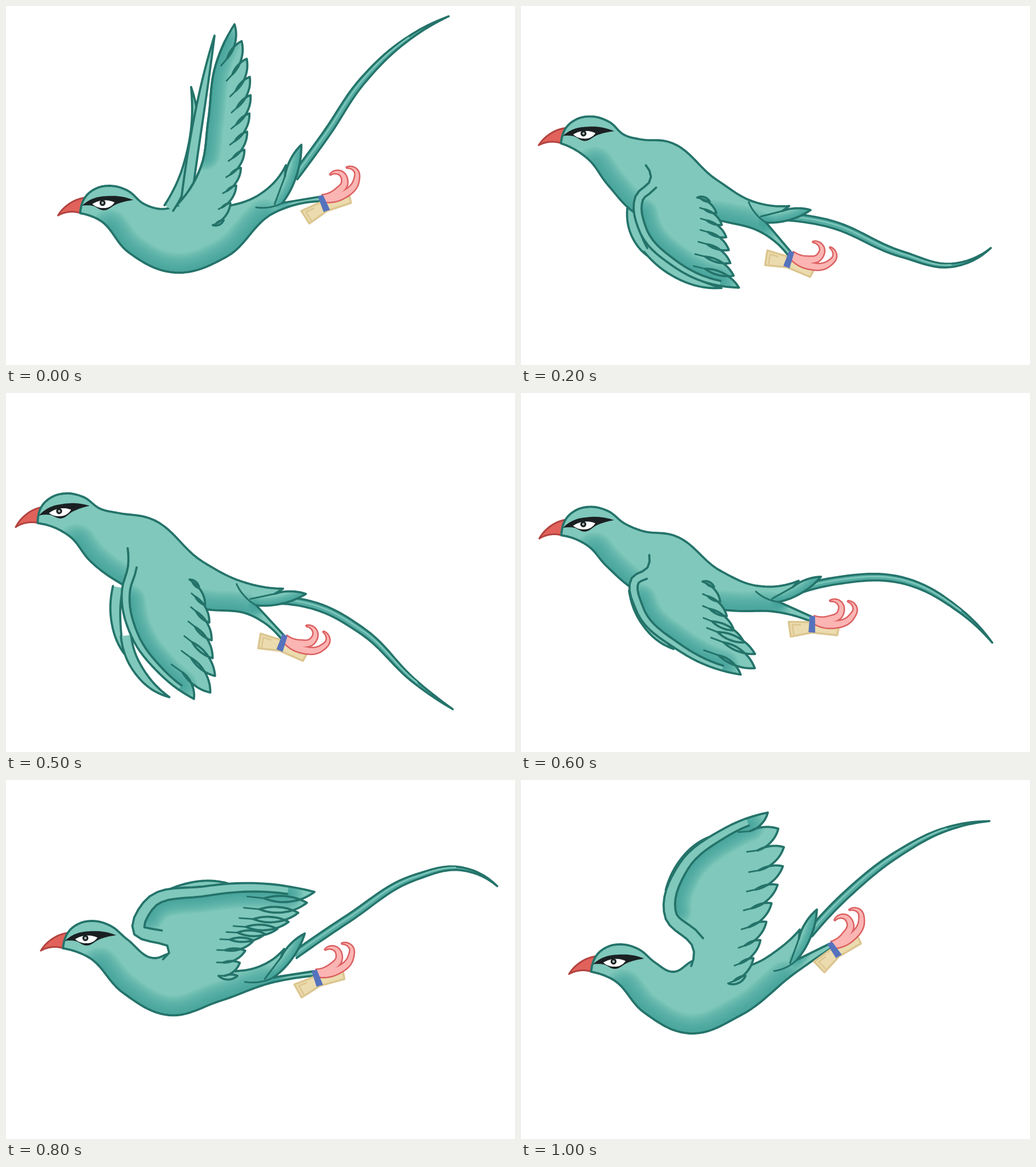
An HTML page with a canvas for the animation above (1100 ms loop, 891 by 629 pixels).

```html
<!DOCTYPE html>
<html lang="en">
<head>
<meta charset="utf-8">
<title>Messenger bird</title>
<style>
html, body { margin: 0; width: 100%; height: 100%; overflow: hidden; background: #fff; }
canvas { display: block; }
</style>
</head>
<body>
<canvas id="stage" width="891" height="629"></canvas>
<script>
const ctx = document.getElementById('stage').getContext('2d');
const LIGHT = '#7fc8bb', MID = '#55aca3', SHADE = '#3d9a95', LINE = '#24736a', INK = '#1a2022';

// Key joints as "x,y"; everything between them follows from the rules below.
// head, foot: x,y,degrees. fan: two tail tips and the hip.
// plumes: count, then angle and length of the first and the last one.
const rise = {
  side: '1', band: '0', head: '91,367,0', foot: '550,334,0',
  back: '265,355 318,346 395,349 450,326', fan: '490,279 517,243 484,345',
  belly: '470,362 385,440 295,467 215,432 160,373',
  tail: '505,300 560,225 625,130 700,60 775,18',
  far: '285,354 324,260 324,142|315,345 340,180 365,52',
  lead: '300,348 340,285 354,200 368,100 400,32',
  trail: '400,32 422,95 420,235 381,375', plumes: '11,-50,40,-25,14'
};
const dive = {
  side: '-1', band: '16', head: '45,282,1', foot: '497,414,27',
  back: '222,271 258,269 340,322 415,345', fan: '473,336 513,333 447,374',
  belly: '450,404 368,390 200,390 155,338 122,300',
  tail: '465,358 560,352 735,388 815,362 862,286',
  far: '190,375 215,420 258,441|230,420 310,453 418,463',
  lead: '236,306 246,314 197,326 188,365 260,427 438,449',
  trail: '438,449 390,405 362,372 335,357', plumes: '7,-10,48,0,17'
};
const press = {
  side: '-1', band: '16', head: '17,206,1', foot: '448,448,55',
  back: '195,196 255,206 345,287 410,344', fan: '466,365 501,382 411,385',
  belly: '400,394 338,364 203,338 150,290 108,232',
  tail: '450,380 510,408 600,482 700,546 783,562',
  far: '200,335 197,400 215,450|215,430 240,485 284,525',
  lead: '201,252 209,285 204,340 225,420 270,483 325,538',
  trail: '325,538 352,533 357,440 326,329', plumes: '7,37,55,37,14'
};
const hold = {
  side: '-1', band: '16', head: '17,235,-4.5', foot: '487,425,42',
  back: '195,210 250,219 345,296 415,331', fan: '485,343 525,352 438,372',
  belly: '430,390 345,378 203,335 148,295 110,250',
  tail: '455,364 530,370 625,418 715,505 782,554',
  far: '196,340 193,405 207,457|210,425 235,490 286,533',
  lead: '213,272 214,300 203,345 218,423 265,488 329,536',
  trail: '329,536 354,528 361,455 338,342', plumes: '7,36,60,42,15'
};
const glide = {
  side: '-1', band: '16', head: '47,275,0', foot: '531,359,7',
  back: '225,272 285,280 355,328 415,345', fan: '487,315 525,292 465,360',
  belly: '470,378 400,385 205,362 150,310 122,284',
  tail: '490,336 580,287 720,241 810,249 868,321',
  far: '200,350 250,405 327,440|300,300 360,322 440,322',
  lead: '236,296 232,306 185,303 185,338 280,410 440,451',
  trail: '440,451 467,434 383,374 338,338', plumes: '7,3,75,8,15'
};
const lift = {
  side: '1', band: '24', head: '61,299,0', foot: '539,335,3',
  back: '262,312 286,304 400,335 440,328', fan: '487,296 523,269 468,346',
  belly: '470,354 375,387 285,412 205,373 140,308',
  tail: '505,307 600,242 715,171 800,156 860,186',
  far: '262,215 315,190 388,181',
  lead: '275,314 286,302 222,265 240,215 350,186 540,196',
  trail: '540,196 493,250 425,290 405,343', plumes: '9,6,75,0,22'
};
const soar = {
  side: '1', band: '24', head: '84,340,0', foot: '540,287,-12',
  back: '265,336 303,316 400,325 450,297', fan: '488,262 518,227 483,315',
  belly: '480,338 385,412 295,444 215,407 158,348',
  tail: '505,270 575,196 665,126 745,86 820,72',
  far: '262,195 285,145 329,100',
  lead: '298,326 303,303 252,240 275,150 350,88 432,57',
  trail: '432,57 456,99 436,225 393,343', plumes: '9,-5,50,-24,22'
};
const skull = '39,-4 41,-17 47,-31 64,-46 91,-52 121,-44 151,-20';

function between(a, b) {
  const pose = {};
  for (const key in a) {
    const other = b[key].match(/-?[\d.]+/g);
    let i = 0;
    pose[key] = a[key].replace(/-?[\d.]+/g, n => (+n + +other[i++]) / 2);
  }
  return pose;
}

const stretch = {
  ...between(press, hold), head: '10,219,-2',
  tail: '455,375 520,395 605,463 700,548 765,580'
};
const poses = [rise, dive, between(dive, press), press, stretch, hold,
  between(hold, glide), glide, lift, between(lift, soar), soar];

const numbers = s => s.split(',').map(Number);
const points = s => s.split(' ').map(numbers);
const lerp = (a, b, t) => a + (b - a) * t;
const toward = (p, q, t) => [lerp(p[0], q[0], t), lerp(p[1], q[1], t)];
const angle = (p, q) => Math.atan2(q[1] - p[1], q[0] - p[0]);
const dist = (p, q) => Math.hypot(q[0] - p[0], q[1] - p[1]);

// Direction of the circle through a point and its neighbours.
function heading(pts, i) {
  const p = pts[i], a = pts[i - 1], b = pts[i + 1];
  if (!a || !b) {
    const chord = a ? angle(a, p) : angle(p, b);
    return pts.length > 2 ? 2 * chord - heading(pts, a ? i - 1 : 1) : chord;
  }
  const u = dist(a, p) ** 2, v = dist(p, b) ** 2;
  return Math.atan2((p[1] - a[1]) / u + (b[1] - p[1]) / v, (p[0] - a[0]) / u + (b[0] - p[0]) / v);
}

function smooth(pts) {
  const line = [pts[0]];
  for (let i = 1; i < pts.length; i++) {
    const p = pts[i - 1], q = pts[i], r = dist(p, q) * 0.36;
    const h = heading(pts, i - 1), k = heading(pts, i);
    const c = [p[0] + r * Math.cos(h), p[1] + r * Math.sin(h)];
    const d = [q[0] - r * Math.cos(k), q[1] - r * Math.sin(k)];
    for (let n = 1; n <= 12; n++) {
      const t = n / 12, m = toward(c, d, t);
      line.push(toward(toward(toward(p, c, t), m, t), toward(m, toward(d, q, t), t), t));
    }
  }
  return line;
}

// n + 1 points at equal distances along a smooth line.
function spread(pts, n) {
  const line = smooth(pts), sums = [0];
  for (let i = 1; i < line.length; i++) sums.push(sums[i - 1] + dist(line[i - 1], line[i]));
  return Array.from({ length: n + 1 }, (_, k) => {
    const s = sums[sums.length - 1] * k / n;
    const i = Math.max(1, sums.findIndex(v => v >= s - 1e-6));
    return toward(line[i - 1], line[i], (s - sums[i - 1]) / (sums[i] - sums[i - 1]));
  });
}

function offset(line, width) {
  return line.map((p, i) => {
    const a = angle(line[i - 1] || p, line[i + 1] || p), w = width(i / (line.length - 1));
    return [p[0] - w * Math.sin(a), p[1] + w * Math.cos(a)];
  });
}

function bow(p, q, k) {
  const [x, y] = toward(p, q, 0.5);
  return smooth([p, [x + (q[1] - p[1]) * k, y - (q[0] - p[0]) * k], q]);
}

function trace(line) {
  const path = new Path2D();
  line.forEach(p => path.lineTo(...p));
  return path;
}

const outline = s => trace(s.split('|').flatMap(part => smooth(points(part))));

function stroke(path, color = LINE, width = 3.8) {
  ctx.strokeStyle = color;
  ctx.lineWidth = width;
  ctx.stroke(path);
}

function shape(path, fill, line, width) {
  ctx.fillStyle = fill;
  ctx.fill(path);
  if (line) stroke(path, line, width);
}

// Soft shadow along a line, kept inside a shape.
function soft(line, clip, size) {
  const path = trace(line);
  ctx.save();
  ctx.clip(clip);
  ctx.globalAlpha = 0.12;
  for (let k = 2; k <= 12; k++) stroke(path, SHADE, size * k / 12);
  ctx.restore();
}

// A strip that narrows to a point at its end.
function ribbon(pts, half) {
  const mid = spread(pts, 40), taper = t => half * (1 - t ** 3);
  return trace([...offset(mid, taper), ...offset(mid, t => -taper(t)).reverse()]);
}

function streamer(pts) {
  shape(ribbon(pts, 6.2), MID, LINE, 3.6);
  stroke(trace(offset(spread(pts, 40), () => -1).slice(0, 33)), LIGHT, 2.4);
}

function farWing(pose) {
  for (const part of pose.far.split('|')) shape(ribbon(points(part), 9), LIGHT, LINE, 3.8);
}

function wing(pose) {
  const side = +pose.side, lead = spread(points(pose.lead), 30);
  const [count, a0, l0, a1, l1] = numbers(pose.plumes);
  const edge = [...lead], veins = [];
  spread(points(pose.trail), count).slice(1).forEach((tip, i) => {
    const t = i / (count - 1), a = lerp(a0, a1, t) * Math.PI / 180, len = lerp(l0, l1, t);
    const back = k => [tip[0] - Math.cos(a) * len * k, tip[1] - Math.sin(a) * len * k];
    edge.push(...bow(edge[edge.length - 1], back(1), side * 0.13), ...bow(back(1), tip, side * 0.1));
    veins.push([back(1), back(1.4)]);
    if (t === 1) edge.push(...bow(tip, back(1.5), side * 0.2));
  });

  const inner = offset(lead, t => side * pose.band * (1 - t / 2)).slice(3, 28);
  const path = trace(edge);
  shape(path, LIGHT);
  soft(inner.slice(6), path, 56);
  ctx.save();
  ctx.clip(path);
  shape(trace([...lead.slice(0, 28), ...inner.slice().reverse()]), LIGHT);
  ctx.restore();
  stroke(trace(inner));
  stroke(path);
  veins.forEach(v => stroke(trace(v), LINE, 2.8));
}

function spin(p, [x, y, deg]) {
  const a = deg * Math.PI / 180, c = Math.cos(a), s = Math.sin(a);
  return [x + p[0] * c - p[1] * s, y + p[0] * s + p[1] * c];
}

function place(s, draw) {
  const [x, y, deg] = numbers(s);
  ctx.save();
  ctx.translate(x, y);
  ctx.rotate(deg * Math.PI / 180);
  draw();
  ctx.restore();
}

function torso(pose) {
  const [tip, tip2, hip] = points(pose.fan), belly = points(pose.belly);
  const head = points(skull).map(p => spin(p, numbers(pose.head)));
  const foot = numbers(pose.foot), ankle = spin([2, 8], foot);
  const notch = toward(tip, hip, 0.3), thigh = toward(foot, hip, 1.7);
  const under = smooth([ankle, ...belly, head[0]]);
  const vent = bow(tip2, hip, 0.08);
  const path = trace([
    ...smooth([...head, ...points(pose.back), tip]),
    ...bow(notch, tip2, 0.08), ...vent, foot, ...under
  ]);
  shape(path, LIGHT);
  soft(under.slice(14, -16), path, 68);
  soft(vent, path, 30);
  stroke(path);
  stroke(trace(bow(hip, thigh, 0.08)), LINE, 3);
  stroke(trace([notch, toward(hip, thigh, 0.3)]), LINE, 3);
}

function beak() {
  shape(outline('0,0 19,-20 46,-31|40,-4 18,-6 0,0'), '#e0625b', '#b3433f', 3);
}

function eye() {
  shape(outline('42,-17 60,-29 85,-34 132,-27|132,-27 103,-20 80,-9 60,-17 42,-17'), INK);
  shape(outline('60,-20 76,-26 99,-23|99,-23 90,-15 78,-13 60,-20'), '#fff');
  for (const [r, color] of [[5.2, INK], [2.2, '#a5b3b0']]) {
    ctx.fillStyle = color;
    ctx.beginPath();
    ctx.arc(78, -22, r, 0, 7);
    ctx.fill();
  }
}

function foot() {
  shape(outline('-33,25 -2,11|50,-6 54,11|12,25 -19,47|-33,25'), '#ebdbae', '#dcc690', 3.5);
  stroke(outline('-16,41 -25,27|-12,21'), '#dcc690', 2.5);
  const toes = ['5,3 30,-8 43,-26 36,-41 18,-39', '5,3 40,-3 63,-27 62,-46 47,-51'].map(s => ribbon(points(s), 5.5));
  toes.forEach(toe => stroke(toe, '#dc6061', 5));
  toes.forEach(toe => shape(toe, '#fbb5b3'));
  shape(outline('-4,0 5,-3|17,23 6,27'), '#5572bd');
}

function bird(pose) {
  const up = pose.side > 0;
  ctx.clearRect(0, 0, 891, 629);
  streamer(points(pose.tail));
  if (!up) farWing(pose);
  place(pose.head, beak);
  torso(pose);
  if (up) farWing(pose);
  wing(pose);
  place(pose.head, eye);
  place(pose.foot, foot);
}

ctx.lineJoin = ctx.lineCap = 'round';
const start = performance.now();
let shown = -1;
function tick() {
  const step = Math.floor((performance.now() - start) / 100) % poses.length;
  if (step !== shown) bird(poses[shown = step]);
  requestAnimationFrame(tick);
}
tick();
</script>
</body>
</html>
```
